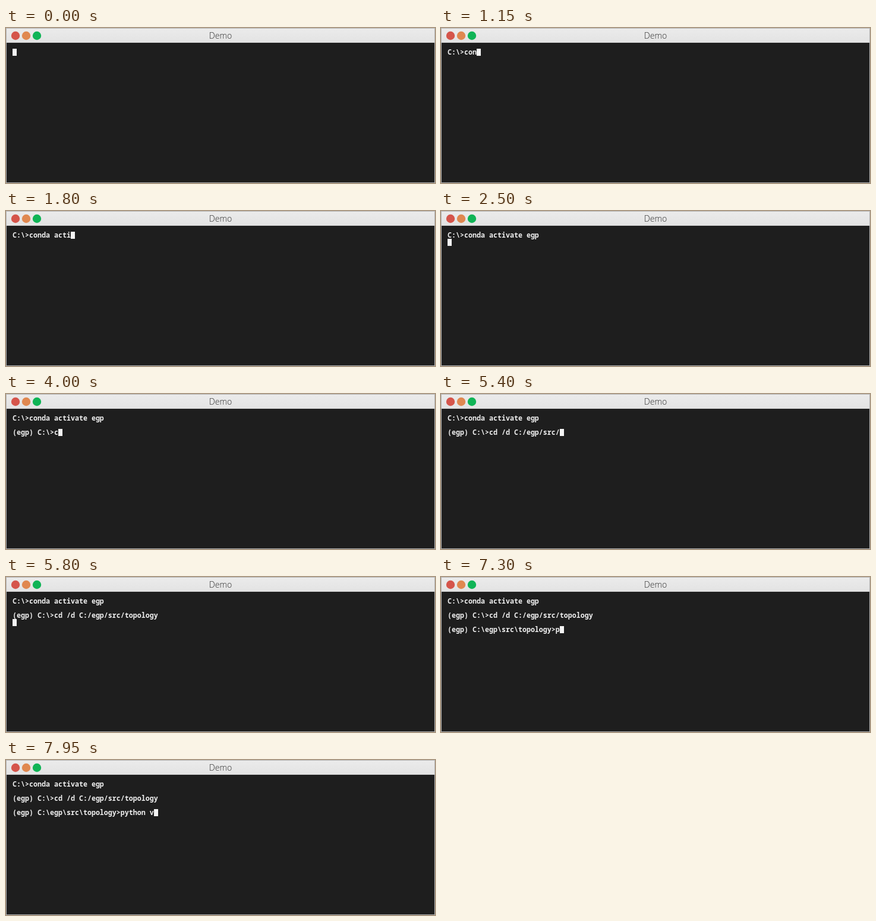
An HTML page that plays this animation: 722x262 px, repeating every 8 s.

```html
<!DOCTYPE html>
<html lang="en">
<head>
<meta charset="utf-8">
<title>Demo</title>
<style>
  html, body { margin: 0; width: 100%; height: 100%; overflow: hidden; background: #1e1e1e; }
  svg { display: block; width: 722px; height: 262px; }
  .title { font: 300 14.2px "Open Sans", sans-serif; fill: #2c2c2c; text-anchor: middle; }
  .term text { font: 600 11.667px "Noto Sans Mono", monospace; fill: #f0f0f0; white-space: pre; }
</style>
</head>
<body>
<svg viewBox="0 0 722 262">
  <defs>
    <linearGradient id="bar" x2="0" y2="1">
      <stop stop-color="#ebebeb"/>
      <stop offset="1" stop-color="#e3e3e3"/>
    </linearGradient>
  </defs>
  <rect width="722" height="262" fill="#b4b4b4"/>
  <rect x="1" y="1" width="720" height="260" fill="#1e1e1e"/>
  <rect x="1" y="1" width="720" height="24" fill="url(#bar)"/>
  <rect x="1" y="24" width="720" height="1" fill="#d0d0d0"/>
  <circle cx="16" cy="13" r="7.2" fill="#d5554b"/>
  <circle cx="34" cy="13" r="7.2" fill="#e08850"/>
  <circle cx="52" cy="13" r="7.2" fill="#10b456"/>
  <text class="title" x="361" y="18">Demo</text>
  <g class="term" id="term"></g>
  <rect id="cursor" width="7" height="12" fill="#f4f4f4"/>
</svg>
<script>
const LOOP = 8000, KEY = 50, LEFT = 11, TOP = 35, CELL = 7, ROW = 12;
const term = document.getElementById("term");
const cursor = document.getElementById("cursor");

// Prompts land whole, commands are typed one key at a time.
const prompt = (at, text) => ({ at, text, step: 0 });
const type = (at, text) => ({ at, text, step: KEY });
const script = [
  prompt(50, "C:\\>"),
  type(1050, "conda"), type(1450, " "), type(1650, "activate"),
  type(2200, " "), type(2400, "egp"), prompt(2500, "\n"),
  prompt(3000, "\n(egp) C:\\>"),
  type(4000, "cd"), type(4250, " "), type(4450, "/d"), type(4700, " "),
  type(4900, "C:/egp/src/topology"), prompt(5800, "\n"),
  prompt(6300, "\n(egp) C:\\egp\\src\\topology>"),
  type(7300, "python"), type(7750, " "), type(7950, "v")
];

const rows = Array.from({ length: 5 }, (_, i) => {
  const row = document.createElementNS("http://www.w3.org/2000/svg", "text");
  row.setAttribute("x", LEFT);
  row.setAttribute("y", TOP + i * ROW + 10);
  return term.appendChild(row);
});

function screenAt(time) {
  let out = "";
  for (const { at, text, step } of script) {
    if (time < at) break;
    out += step ? text.slice(0, Math.floor((time - at) / step) + 1) : text;
  }
  return out;
}

let shown = null;
function render(time) {
  const out = screenAt(time);
  if (out === shown) return;
  shown = out;
  const lines = out.split("\n");
  rows.forEach((row, i) => { row.textContent = lines[i] || ""; });
  const last = lines.length - 1;
  cursor.setAttribute("x", LEFT + lines[last].length * CELL);
  cursor.setAttribute("y", TOP + last * ROW);
}

const start = performance.now();
function tick() {
  render((performance.now() - start) % LOOP);
  requestAnimationFrame(tick);
}
render(0);
requestAnimationFrame(tick);
</script>
</body>
</html>
```
